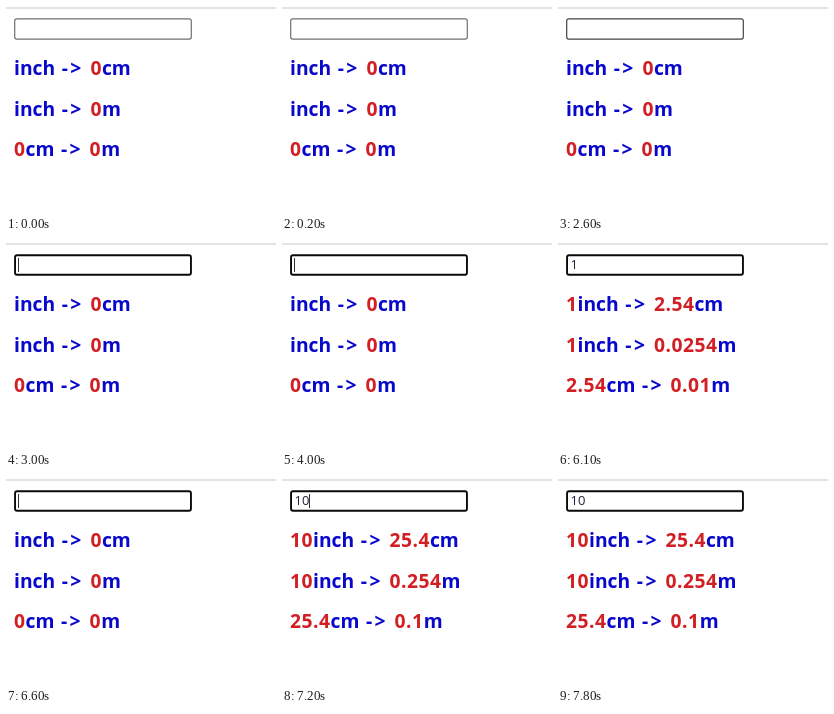
These frames come from a looping animation (270 by 208 pixels, 8000 ms). An HTML page:

```html
<!DOCTYPE html>
<html lang="en">
<head>
<meta charset="utf-8">
<title>Inch converter</title>
<style>
  html, body { margin: 0; width: 100%; height: 100%; overflow: hidden; background: #fff; }
  svg { display: block; }
  text { font-family: "Open Sans", "Noto Sans", sans-serif; white-space: pre; }
  .line { font-size: 19.3px; font-weight: 700; word-spacing: 1.5px; fill: #0808cd; }
  .num { fill: #d21f24; letter-spacing: .5px; }
  .arrow { letter-spacing: 2.5px; }
  #value { font-size: 13px; fill: #22223c; }
  #field { fill: #fff; }
  #caret { fill: #333; }
</style>
</head>
<body>
<svg width="270" height="208" viewBox="0 0 270 208">
  <rect y="1" width="270" height="2" fill="#e3e3e3"/>
  <rect id="field"/>
  <text id="value" x="12.5" y="27"></text>
  <rect id="caret" y="16" width="1" height="14"/>
  <text class="line" x="8" y="69"></text>
  <text class="line" x="8" y="110"></text>
  <text class="line" x="8" y="150"></text>
</svg>
<script>
const LOOP = 8000;

// [time, input text, border state, caret visible]
const steps = [
  [0, "", "idle", 0],
  [2600, "", "hover", 0],
  [2900, "", "focus", 1],
  [3400, "", "focus", 0],
  [4000, "", "focus", 1],
  [4400, "1", "focus", 1],
  [5000, "1", "focus", 0],
  [5500, "1", "focus", 1],
  [6000, "1", "focus", 0],
  [6500, "", "focus", 1],
  [7000, "1", "focus", 1],
  [7200, "10", "focus", 1],
  [7800, "10", "focus", 0]
];

const borders = {
  idle: ["#707070", 1.2],
  hover: ["#444", 1.2],
  focus: ["#0a0a0a", 1.9]
};

const $ = id => document.getElementById(id);
const lines = document.querySelectorAll(".line");
const round = n => String(+n.toFixed(4));

function setAttrs(el, attrs) {
  for (const key in attrs) el.setAttribute(key, attrs[key]);
}

function drawField(state) {
  const [stroke, w] = borders[state];
  setAttrs($("field"), {
    x: 8.1 + w / 2, y: 12.3 + w / 2, width: 177.8 - w, height: 21.4 - w,
    rx: 2, stroke, "stroke-width": w
  });
}

function drawLine(el, from, fromUnit, to, toUnit) {
  const span = (cls, s) => `<tspan class="${cls}">${s}</tspan>`;
  el.innerHTML = span("num", from) + fromUnit + " " +
    span("arrow", "-&gt;") + " " + span("num", to) + toUnit;
}

function show([, text, state, caret]) {
  const cm = round(text * 2.54);
  drawField(state);
  $("value").textContent = text;
  const width = text ? $("value").getComputedTextLength() : 0;
  setAttrs($("caret"), { x: Math.round(12 + width), opacity: caret });
  drawLine(lines[0], text, "inch", cm, "cm");
  drawLine(lines[1], text, "inch", round(text * 0.0254), "m");
  drawLine(lines[2], cm, "cm", round(text * 0.01), "m");
}

let current;
const start = performance.now();

function tick() {
  const t = (performance.now() - start) % LOOP;
  const step = steps.filter(s => s[0] <= t).pop();
  if (step !== current) show(current = step);
  requestAnimationFrame(tick);
}
tick();
</script>
</body>
</html>
```
